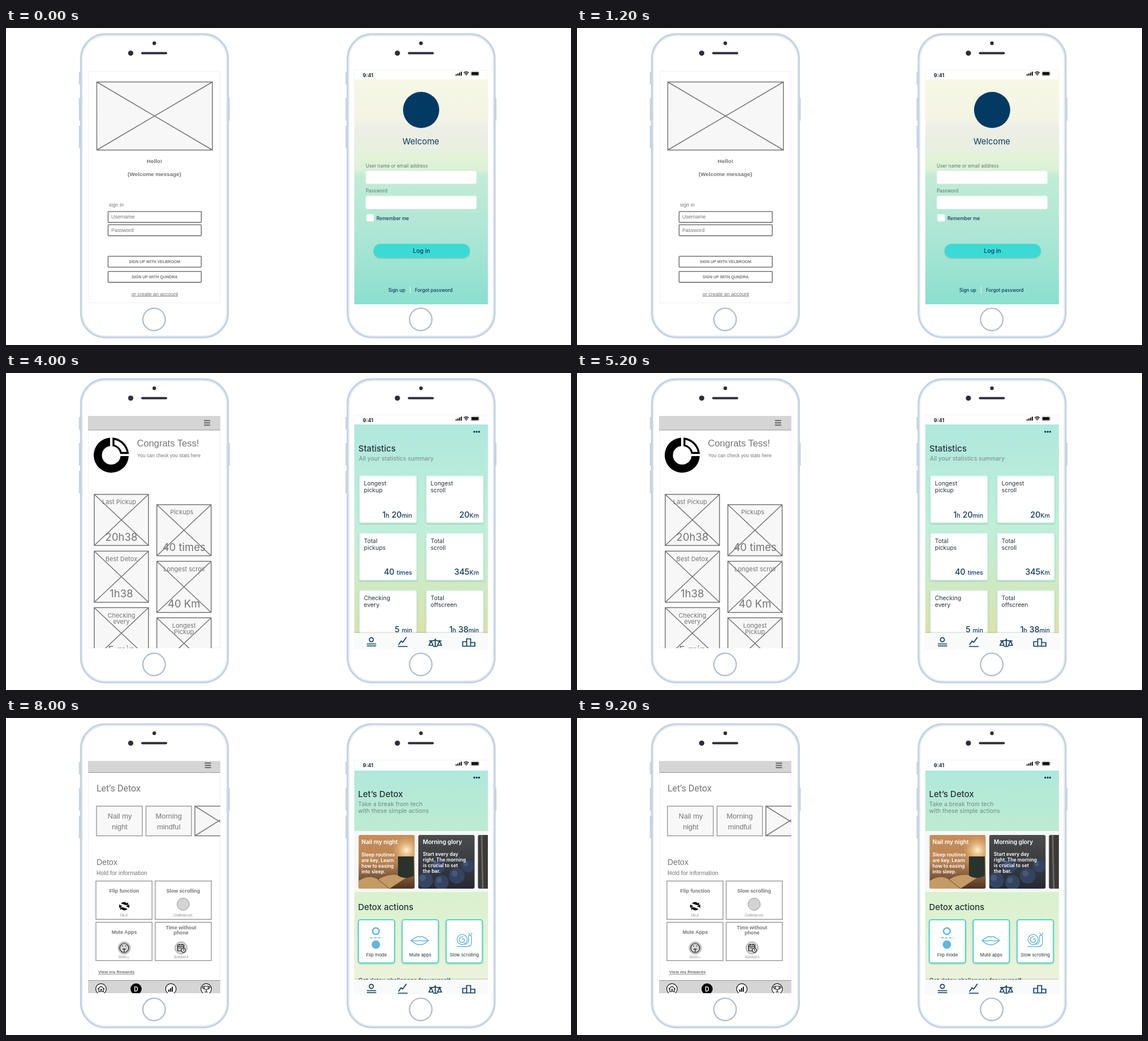
Write an HTML page that moves like this. It is 999 px wide and 561 px high and loops after 10 s.

```html
<!DOCTYPE html>
<html lang="en">
<head>
<meta charset="utf-8">
<title>Wireframes and screens</title>
<style>
html, body { margin: 0; width: 100%; height: 100%; overflow: hidden; background: #fff; }
svg { display: block; width: 999px; height: 561px; }
.scene { visibility: hidden; animation: show 10s step-end infinite; }
@keyframes show {
  0% { visibility: visible; }
  20%, 100% { visibility: hidden; }
}
.wire { clip-path: url(#clipL); font-family: "Liberation Sans", Arial, sans-serif; fill: #757575; }
.app { clip-path: url(#clipR); font-family: Inter, sans-serif; fill: #26333c; }
.geo { font-family: Inter, sans-serif; }
.rob { font-family: Roboto, sans-serif; }
.c { text-anchor: middle; }
.e { text-anchor: end; }
.b { font-weight: 700; }
.m { font-weight: 500; }
.sb { font-weight: 600; }
.u { text-decoration: underline; }
.navy { fill: #0b3a5d; }
.white { fill: #fff; }
.grey { fill: #74898a; }
.pale { fill: #999; }
.dark { fill: #222; }
.box { fill: #f7f7f7; stroke: #757575; stroke-width: 1.5; }
.line { fill: none; stroke: #757575; stroke-width: 1.6; }
.ink { fill: none; stroke: #0b3a5d; stroke-width: 1.7; }
.black { fill: none; stroke: #111; stroke-width: 1.2; }
.blue { fill: none; stroke: #64b5d9; stroke-width: 1.4; }
.bar { fill: #d5d5d5; stroke: #969696; }
.thick { font-weight: 400; stroke: #757575; stroke-width: .4; }
.shade { filter: drop-shadow(0 1px 1px rgba(40, 80, 80, .3)); }
</style>
</head>
<body>
<svg id="stage" viewBox="0 0 999 561"></svg>
<script>
// Drawing helpers, each returns markup
const txt = (x, y, size, lines, cls = '', gap = size * 1.17) => lines.split('|').map((s, i) =>
  `<text x="${x}" y="${y + i * gap}" font-size="${size}" class="${cls}">${s}</text>`).join('');
const row = (x, step, y, size, words, cls) => words.split(' ').map((w, i) => txt(x + i * step, y, size, w, cls)).join('');
const rect = (x, y, w, h, r = 0, attr = '') => `<rect x="${x}" y="${y}" width="${w}" height="${h}" rx="${r}" ${attr}/>`;
const circle = (x, y, r, attr = '') => `<circle cx="${x}" cy="${y}" r="${r}" ${attr}/>`;
const path = (d, attr = '') => `<path d="${d}" ${attr}/>`;
const g = (attr, ...parts) => `<g ${attr}>${parts.join('')}</g>`;
const at = (x, y, ...parts) => g(`transform="translate(${x} ${y})"`, ...parts);
const cls = name => `class="${name}"`;
const fill = (color, stroke = 'none', width = 1) => `fill="${color}" stroke="${stroke}" stroke-width="${width}"`;
const stroke = (color, width = 1) => fill('none', color, width);
const clip = (id, ...box) => `<clipPath id="${id}">${rect(...box)}</clipPath>`;
const grad = (id, ...stops) => `<linearGradient id="${id}" x2="0" y2="1">${stops.map((s, i) => {
  const [color, pos = i / (stops.length - 1)] = s.split(' ');
  return `<stop offset="${pos}" stop-color="${color}"/>`;
}).join('')}</linearGradient>`;

// Shared parts
const holder = (x, y, w, h) => path(`M${x} ${y}h${w}v${h}h${-w}zl${w} ${h}m${-w} 0l${w} ${-h}`, cls('box'));
const menu = (x, y) => path(`M${x - 5.5} ${y - 4}h11m-11 4h11m-11 4h11`, stroke('#666', 2));
const dots = (y = 104) => [828, 832.3, 836.5].map(x => circle(x, y, 1.7, cls('navy'))).join('');
const back = (id, y = 91, h = 370) => rect(616, y, 236, h, 0, `fill="url(#${id})"`);
const header = h => rect(145, 75, 235, h, 0, cls('bar'));
const field = (x, y) => rect(x, y, 196, 23.5, 3, fill('#fff', '#d9eee3'));
const paper = (x, y, w, h, r, edge = 'none', width = 2) => rect(x, y, w, h, r, fill('#fff', edge, width) + cls('shade'));

const phone = x => at(x, 0,
  path('M130 78v22m0 24v40m0 9v40M394.500 124v40'.replace(/00\b/, ''), stroke('#c8d3e2', 2.4)),
  rect(132.5, 11, 260, 536.5, 43, fill('#fff', '#c6d2e3', 3.4)),
  rect(135, 13.5, 255, 531.5, 41, stroke('#e6f0f8', 1.8)),
  g('fill="#2f2d3c"', circle(262.2, 27, 3.2), circle(220.5, 44.5, 4.6), rect(239, 42.5, 46, 4, 2)),
  circle(261.8, 515.7, 19.8, fill('#fff', '#b0bdce', 2.3)));

const nav = (y = 0) => at(0, y,
  rect(616, 457, 236, 40, 0, 'fill="#f9fafa" filter="drop-shadow(0 -1px 1px rgba(60,80,80,.25))"'),
  g(cls('ink'), circle(646, 469, 3.6),
    path('M638 476.5h16.5M638 480h16.5M693 481h17M694 478l4.5-6.5 3 2 6.5-9'),
    path('M759 467v14m-4 0h8M748 471q5.500 1 11-1.500 5.500 2.500 11 1.500M751.500 471l-3.500 8h7zm15 0l-3.500 8h7z'.replace(/(\.\d)00/g, '$1')),
    path('M807.5 472.5h7v8h-7zm7-5h7v13h-7zm7 6.5h7.5v6.5h-7.5z')));

// Bottom tabs of the wireframe; active is the index of the filled one
const tabs = (y, active) => at(0, y, rect(145, 0, 235, 30, 0, cls('bar')),
  [168, 230, 291.5, 354].map((x, i) => circle(x, 15, 9.3, fill(i === active ? '#000' : '#fff', '#111', 1.2))).join(''),
  path('M162 15.5l6-5.5 6 5.5M164 14v6h3v-4h2.5v4h3v-6M350.5 10h7v4q-3.5 5-7 0zv1h-3q0 4 4 4M357.5 11h3q0 4-4 4M354 17v3m-3 .5h6', cls('black')),
  txt(230, 19.3, 12, 'D', `rob m c ${active === 1 ? 'white' : 'dark'}`),
  path('M287 16h2v4h-2zm3-2.5h2v6.5h-2zm3-2.5h2v9h-2z', fill(active === 2 ? '#fff' : '#111')));

const ring = (x, label) => at(x, 162, circle(0, 0, 10, stroke('#000', 6)),
  path('M-14-1h8M-1.5-14v8', stroke('#fff', 2)),
  path('M-10.3-3A10.5 10.5 0 0 1-3-10.3', stroke('#fff', 2)), txt(0, 4, 11, label, 'rob m c dark'));
const mark = (x, y) => at(x, y, circle(0, 0, 6, fill('#d0d0d0', '#333')), path('M-4.2-4.2l8.4 8.4m-8.4 0l8.4-8.4', stroke('#333')));

const stat = (x, y, label, value) => paper(x, y, 101, 83, 2, '#d3f2ee') + txt(x + 7.8, y + 17.3, 10.4, label) +
  txt(x + 93, y + 73.5, 14.3, value.replace(/[a-z]+/gi, '<tspan font-size="10.5">$&</tspan>'), 'navy m e');
const tile = (x, label) => paper(x, 357, 64, 76.5, 4, '#52d8d0') + txt(x + 32, 422, 7.9, label, 'c');

const defs = `<defs>${clip('clipL', 145.5, 76, 233.5, 411)}${clip('clipR', 616, 74, 236, 415)}
  ${clip('hero', 624, 397, 220, 62, 3)}${clip('night', 623.5, 207, 99, 95, 3)}${clip('morning', 729, 207, 99.5, 95, 3)}
  ${grad('dawn', '#f6f8e5 0', '#f3f4e5 .18', '#edeee5 .22', '#e9efe1 .31', '#e2f3d8 .34', '#dcf1d6 .4', '#c2ecd7 .43', '#ace6d4 .7', '#8bdfce 1')}
  ${grad('fade', '#90dfd0 0', '#ade6d3 .35', '#c3edd6 .55', '#def2d6 .8', '#f5f7e3 1')}
  ${grad('field', '#b0e8dd 0', '#c0efd9 .5', '#cdeac3 .75', '#e0e0a8 1')}
  ${grad('panel', '#ebf6f7 0', '#eaf5ee .4', '#f1f4df 1')}
  ${grad('mint', '#b1e8dc', '#bcecd0')}${grad('lime', '#d9f1cd', '#ecf3dc')}
  ${grad('sunset', '#f3b05a', '#e2923b')}${grad('wood', '#c78d59', '#b98555', '#4d3220')}
  ${grad('slate', '#4c4c4c', '#242a34')}${grad('area', '#fcc671', '#fde3b8')}
  <radialGradient id="glow"><stop stop-color="#fff3cf"/><stop offset="1" stop-color="#f5b565" stop-opacity="0"/></radialGradient></defs>`;

const signIn = [[
  holder(160.5, 95.5, 204.5, 120.5),
  txt(262.5, 238.5, 9.9, 'Hello!|(Welcome message)', 'b c', 23),
  [324.8, 348.3, 404, 430.8].map(y => rect(180.5, y, 164.8, 19.3, 1, cls('line'))).join(''),
  txt(182, 316, 9, 'sign in'), txt(186, 337, 9, 'Username|Password', '', 23.7),
  txt(262.7, 416, 7, 'SIGN UP WITH VELBROOM|SIGN UP WITH QUNDRA', 'b c', 27),
  txt(263, 473.5, 9, 'or create an account', 'c u'),
], [
  back('dawn', 91, 398), circle(734, 145, 32, 'fill="#013a63"'),
  txt(733.5, 206, 14.8, 'Welcome', 'c navy'),
  field(636, 252.5), field(636, 297), rect(637, 329.5, 13.5, 13, 2.5, fill('#fff', '#d4ebe2')),
  g('fill="#65736f"', txt(636, 246.5, 8.3, 'User name or email address|Password', '', 44.5)),
  txt(655, 339.5, 8.3, 'Remember me', 'navy m'),
  rect(650, 382, 170, 24.5, 12.2, 'class="shade" fill="#3cdad5"'), txt(734.7, 398.3, 10.4, 'Log in', 'c navy m'),
  txt(676, 466.5, 8.3, 'Sign up', 'navy m'), txt(723, 466.5, 8.3, 'Forgot password', 'navy m'),
  path('M714.5 458v12', stroke('#e6f6f1')),
]];

const chips = [[162, 53, 'Total pickups today'], [221, 54, 'Time off screen today'],
  [282, 56.5, 'Kilometers of scroll today'], [345, 54, 'Longest time on screen']];
const bird = i => path(`M${690 + i * 9.3} ${442 - i * 2.4 + 9 * Math.sin(i * 2.3)}l3-1`, stroke('#9b6628', 1.8));

const home = [[
  holder(146.5, 90.5, 231.5, 135.5), menu(355.5, 118),
  g('fill="#7e8985"', txt(160.5, 142.5, 9.6, "Hello Tess!|It's Time For Your Tech Check", '', 11.8)),
  chips.map(([x, w, s]) => rect(x, 208.3, w, 8.5, 3, fill('#fff', '#888')) + txt(x + w / 2, 214, 4.4, s, 'c')).join(''),
  path('M340 237.5v7.5l6-3.7zm22 0v7.5l-6-3.7z', 'fill="#555"'), txt(351, 243, 5, 'Flip', 'c b'),
  path('M344.5 236q5-6 11-1M355 231v4.5h-4.5M356 246q-5 6-11 1m0 4.5v-4.5h4.5', cls('line')),
  holder(161.5, 254.5, 199.5, 117.5), txt(263, 309, 15, '« PHONE OFF|LIFE ON »', 'c thick', 18),
  holder(161.5, 381.8, 95, 118), holder(266, 381.8, 95, 118),
  txt(170.5, 399.5, 9.1, 'Inspiration 1'), txt(276.3, 399.5, 9.1, 'Inspiration 2'),
], [
  back('fade', 91, 250), dots(), txt(624.5, 135.7, 8.4, 'HELLO TESS,'),
  txt(624.5, 161, 15, "It's time for your|tech check"),
  [['Total pickups today', '20 times', 221], ['Time off screen today', '4 hours', 250], ['Km of scroll today', '0.20 km', 282],
    ['Longest time on screen', '30 min', 314]].map(([a, b, y]) => txt(624.5, y + 1, 10.5, a) + txt(771, y, 14.2, b, 'navy m')).join(''),
  path('M616 489V358q6-25 36-25h164q30 0 36 25v131z', 'fill="#fcfdfb"'),
  rect(722, 340.5, 24, 3, 1, 'fill="#f9cd6f"'),
  g('class="ink" style="stroke-width:2.4"', circle(830, 354.7, 4), path('M833 357.5l4.5 3.5')),
  txt(624.5, 385.5, 14.5, 'Your inspiration', 'm'),
  g('clip-path="url(#hero)"', rect(624, 397, 220, 62, 0, 'fill="url(#sunset)"'),
    g('fill="#7a531f"', circle(666, 460, 10), circle(677, 453, 7), circle(684, 460, 7), circle(663, 455, 5)),
    Array.from({ length: 16 }, (_, i) => bird(i)).join('')),
  txt(634, 411.7, 10, 'Your life is what|you pay attention to.', 'white sb', 12.3), nav(),
]];

const cards = [
  [156, 214.7, 'Last Pickup', '20h38'], [156, 315.3, 'Best Detox', '1h38'], [156, 415.3, 'Checking|every', '5 min'],
  [266.7, 233, 'Pickups', '40 times'], [266.7, 333.3, 'Longest scroll', '40 Km'], [266.7, 433.2, 'Longest|Pickup', '']];

const stats = [[
  header(26), menu(355.5, 88.3),
  path('M184 114.5A31 31 0 1 0 217 147H202.5A16.5 16.5 0 1 1 184 129.2z', 'fill="#000"'),
  path('M190 116.2A29.5 29.5 0 0 1 215.3 141.5H203.5A18 18 0 0 0 190 128.2z', fill('#fff', '#000', 3.4)),
  txt(231.5, 129.7, 16.5, 'Congrats Tess!'), txt(232, 148.5, 8.6, 'You can check you stats here'),
  cards.map(([x, y, label, value], i) => holder(x, y, 96, 90.5) +
    txt(x + (i % 3 ? 48 : 44), y + 17.4, 11, label, 'geo c', 11.5) + txt(x + 48, y + 82, 18.5, value, 'geo c')).join(''),
], [
  back('field'), dots(), txt(623, 139, 15, 'Statistics', 'm'), txt(624, 155, 10.4, 'All your statistics summary', 'grey'),
  stat(625, 182, 'Longest|pickup', '1h 20min'), stat(743, 182, 'Longest|scroll', '20Km'),
  stat(625, 283.5, 'Total|pickups', '40 times'), stat(743, 283.5, 'Total|scroll', '345Km'),
  stat(625, 385, 'Checking|every', '5 min'), stat(743, 385, 'Total|offscreen', '1h 38min'), nav(3),
]];

const wave = 'C779 302 782 285.5 802 285.5S827 312 837 313.5l7-1';
const pickup = [[
  header(20.5), menu(357, 82.5), path('M167.5 119.5l-5.5 5.5 5.5 5.5', stroke('#666', 2.4)),
  txt(185, 130.5, 14.7, 'Longest Pickup', 'rob'),
  [...'MTWTFSS'].map((d, i) => ring(177.5 + i * 30.4, d)).join(''),
  txt(165, 201, 9, '10 minutes|5 seconds', '', 29.5), txt(241.5, 230.5, 9, '1 hour'),
  txt(165, 210, 8.7, 'Daily Avg|The shortest', 'pale', 29.5), txt(241.5, 239.5, 8.7, 'The longest', 'pale'),
  txt(165, 280.7, 9.2, 'Your week'),
  path('M166 288v75.3h191M171 291C176 298 180 303 181.5 309C184 322 190 328 200 328.5C208 329 209 328 212 320C216 308 222 306 229 301C236 295 250 291 256 297C264 304 262 317 272 329C277 336 281 340 288 340C299 340 306 338 310 332C315 324 320 323 326 317C331 312 333 311 340 311h22', stroke('#111', 1.7)),
  row(170, 30.25, 375.6, 9, '00 01 02 03 04 05 06', 'rob b c dark'),
  txt(165, 402.5, 9.2, 'Longest pickup at a glance', 'dark'),
  txt(182, 425.5, 9.2, '80% on Picturvan|10% emails', 'dark', 22.5), txt(286.5, 425.5, 9.2, '2% text messages|8% Qundra Flomeb', 'dark', 22.5),
  mark(172.7, 422), mark(277, 422), mark(172.7, 444.3), mark(277, 444.3), tabs(463.5, 2),
], [
  back('field'), dots(104.5), txt(623.5, 139.5, 15, 'Statistics', 'm'),
  rect(625, 152.5, 219, 320, 2, fill('url(#panel)', '#d9f4f0', 2) + cls('shade')),
  path('M814.8 166.3l8.4 8.4m0-8.4l-8.4 8.4', stroke('#f9c15c', 3)),
  txt(637.5, 188.5, 10.3, 'Longest pickup', 'm'), txt(637.5, 207, 9, "Let's zoom in when you used|your phone the longest", 'grey', 11),
  paper(638.3, 239, 86, 19.5, 3, '#f9c66c', 1.5), txt(643, 253, 10, 'Sort by week', 'navy sb'),
  path('M710.5 248.5h9l-4.5 6z', 'fill="#f9c15c"'),
  path(`M640 322v-10q17-5 28 10zM772 322${wave}v9.5z`, 'fill="url(#area)" opacity=".75"'),
  path('M638 276v82h200', stroke('#a2acb0', 1.3)),
  path(`M640 312C671 306 672 338 692 338.5C707 338.5 708 322.5 722 322.5C735 322.5 736 340.5 749.5 340.5C762 340.5 766 334 772 322${wave}`, stroke('#f9c46a', 1.7)),
  circle(749.5, 340.3, 3, fill('#f9b94e', '#fff', 1.3)),
  paper(727, 299, 41, 19, 2), txt(747.7, 312, 8.6, '15 min', 'navy sb c'),
  row(642, 31.8, 373, 10, 'S M T W T F S', 'c grey'),
  txt(637.5, 398.5, 10.3, '15 minutes|5 seconds', '', 36.5), txt(637.5, 410.5, 10.3, 'Daily Avg|The shortest', 'grey', 36.5), nav(3),
]];

const berry = (x, y, r) => circle(x, y, r, 'fill="#34435f"') + circle(x - 4, y - 4, r * .4, 'fill="#536788" opacity=".6"');

const detox = [[
  header(21.5), menu(357, 83.7), txt(160, 129.7, 16, 'Let’s Detox', 'rob'),
  g('style="stroke-width:1.2"', rect(160, 156, 81, 52.5, 0, fill('#f8f8f8', '#858585', 1.2)), rect(247.5, 156, 80.5, 52.5, 0, fill('#f8f8f8', '#858585', 1.2))),
  holder(334, 156, 84, 52.5),
  txt(201, 178.3, 12.8, 'Nail my|night', 'c', 18.2), txt(287.7, 178.3, 12.8, 'Morning|mindful', 'c', 18.2),
  txt(160, 260, 14.2, 'Detox'), txt(160, 277.7, 10.3, 'Hold for information'),
  [[159, 288.5], [263.8, 288.5], [159, 361.5], [263.8, 361.5]].map(([x, y]) => rect(x, y, 99.2, 67.8, 0, fill('#fff', '#858585', 1.2))).join(''),
  txt(209, 309, 8.8, 'Flip function|Mute Apps', 'b c', 73), txt(313.3, 309, 8.8, 'Slow scrolling', 'b c'),
  txt(309.5, 373.5, 8.8, 'Time without|phone', 'b c', 9.8),
  at(209, 333, path('M-9-3v6l6-3zM9-3v6l-6-3zM-6-5q6-5 11 0l2-2v5h-5M6 5q-6 5-11 0l-2 2v-5h5', 'fill="#111"')),
  g(fill('#d4d4d4', '#999'), circle(313.3, 329.5, 10.8), circle(209, 407, 10.8), circle(309.5, 407, 10.8)),
  g(cls('black'), circle(209, 407, 8),
    path('M205 403.5h2m4 0h2M206 409.5q3-2 6 0M209 408v6M303.5 401.5h11v10.5h-11zm0 3h11m-8-5v3m5-3v3m-6 4.5h5'),
    circle(313.5, 411, 3.6, 'style="fill:#fff"'), path('M313.5 409v2h1.5')),
  txt(208.5, 349.5, 5.2, 'Flip it!|Shhhh…', 'c u pale', 74), txt(313, 349.5, 5.2, 'Challenge me!', 'c u pale'), txt(309.5, 423.5, 5.2, 'Schedule it', 'c u pale'),
  txt(163, 452, 7.65, 'View my Rewards', 'b u'), tabs(464.5, 1),
], [
  back('mint', 93, 107), rect(616, 200, 236, 107, 0, 'fill="#f5f7f6"'), back('lime', 307.5, 160), dots(105.5),
  txt(622.5, 139.7, 15, 'Let’s Detox', 'm'), txt(622.5, 156, 10.5, 'Take a break from tech|with these simple actions', 'grey', 12),
  g('clip-path="url(#night)"', rect(623, 207, 100, 96, 0, 'fill="url(#wood)"'), circle(708, 234, 26, 'fill="url(#glow)"'),
    path('M620 291q20-16 38-5 20-14 52-5l-32 21h-58z', 'fill="#c49a66"'), path('M658 286l20 16', stroke('#6a4727')),
    path('M693 245h28v34q-14 8-28 0z', 'fill="#28332b"')),
  g('clip-path="url(#morning)"', rect(729, 207, 100, 96, 0, 'fill="url(#slate)"'),
    berry(741, 287, 14), berry(770, 291, 13), berry(797, 279, 14), berry(817, 262, 11), berry(764, 262, 13)),
  rect(834.5, 207, 30, 95, 3, 'fill="#3b3a39"'), path('M841 207l2 95', stroke('#6b6560', 3)),
  txt(628.5, 223, 10.2, 'Nail my night', 'white sb'), txt(737, 223, 10.2, 'Morning glory', 'white sb'),
  txt(628.5, 245, 8.5, 'Sleep routines|are key. Learn|how to easing|into sleep.', 'white sb', 10.1),
  txt(737, 244, 8.5, 'Start every day|right. The morning|is crucial to set|the bar.', 'white sb', 10.1),
  txt(622.5, 339.5, 15, 'Detox actions', 'm'),
  tile(623, 'Flip mode'), tile(700.5, 'Mute apps'), tile(778.3, 'Slow scrolling'),
  g(cls('blue'), circle(654, 377.3, 5.8, 'stroke-width="2.5"'), path('M643.5 389h22', 'stroke-dasharray="5 2"'), circle(654, 401, 6.8, 'fill="#64b5d9"'),
    path('M716 393.5q9-6 13-7 2 0 3 1.5 1-1.5 3-1.5 4 1 12 7-8 8-15 8-8 0-16-8zq8 2 16 0 8 2 15 0'),
    path('M797 404.5h19q7 0 7-8v-9q0-3-3-3-3 0-2 4v6q-1 6-8 6M820 384l-2-4m4 4l2-4'),
    circle(806.5, 392, 9), path('M806.5 392q2-3 4 0 1 5-4 5-6 0-5-6 2-5 7-4')),
  txt(623, 468, 10.4, 'Get detox challenges for yourself'), nav(6),
]];

const status = g(cls('app'), txt(630.7, 87, 9.2, '9:41', 'b'), g('fill="#111"',
  [2.3, 3.8, 5.3, 7].map((h, i) => rect(795 + i * 3, 84.3 - h, 2, h)).join(''),
  rect(823, 78, 12.5, 5.5, 1), rect(821.9, 76.9, 14.7, 7.7, 2, stroke('#888', .6)), path('M812 82.3h3.6l-1.8 2z'),
  path('M809.3 79.3q4.5-3.6 9 0M811 81.4q2.8-2.2 5.6 0', stroke('#111', 1.4))));

const scenes = [signIn, home, stats, pickup, detox].map(([wire, app], i) =>
  g(`class="scene" style="animation-delay:${i ? i * 2 - 10 : 0}s"`, g(cls('wire'), ...wire), g(cls('app'), ...app)));

document.getElementById('stage').innerHTML = [defs, phone(0), phone(471.5),
  rect(146, 76.5, 232.5, 410, 0, fill('#fff', '#efefef')), rect(616, 74.5, 236, 414, 0, fill('#fff', '#f0f2f2')),
  ...scenes, status].join('');
</script>
</body>
</html>
```
